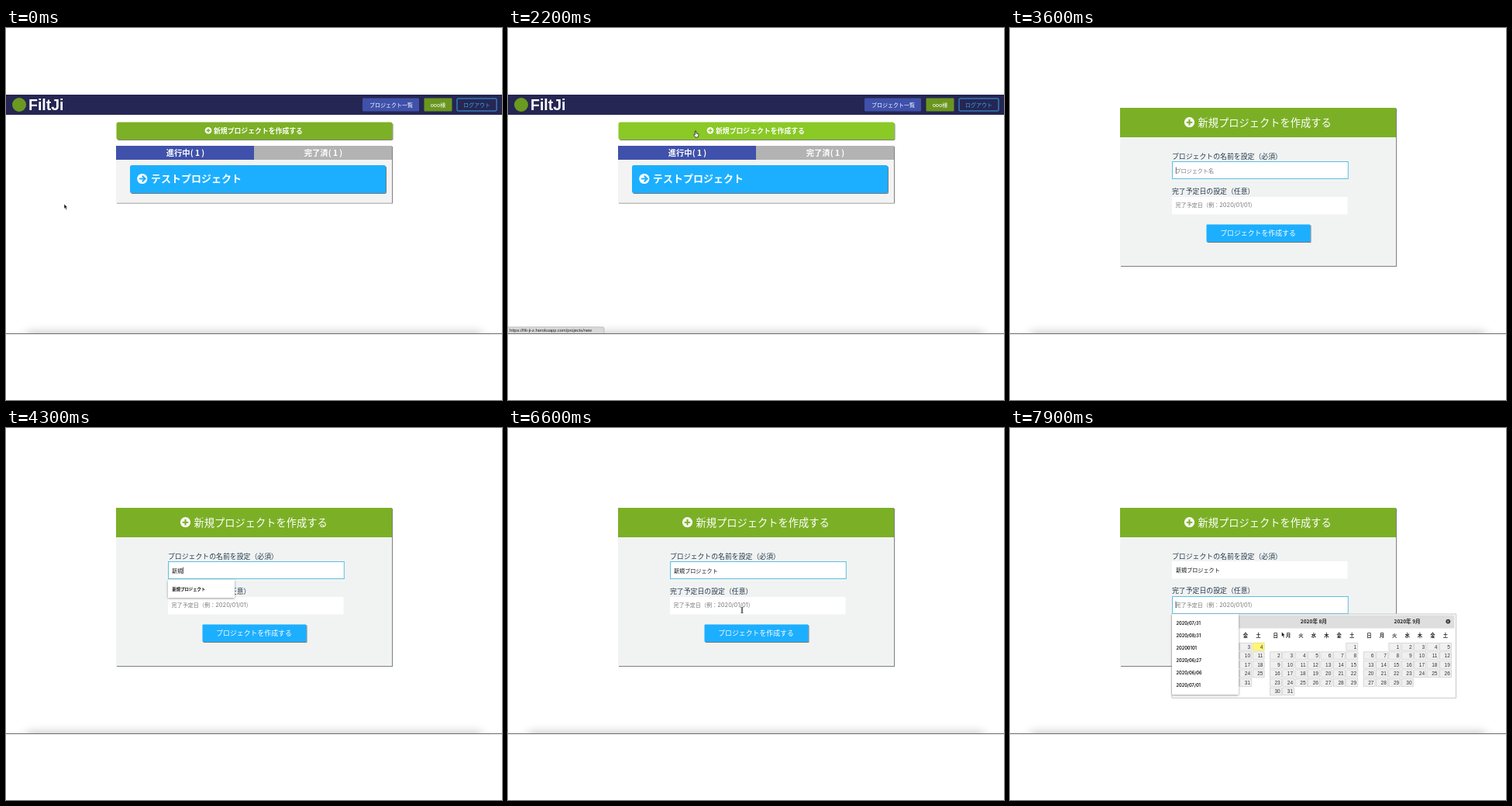
An HTML page that plays this animation: 640 px wide and 480 px high, repeating every 8000 ms.

```html
<!DOCTYPE html>
<html lang="ja">
<head>
<meta charset="utf-8">
<title>Project form</title>
<style>
html, body { margin: 0; width: 100%; height: 100%; overflow: hidden; background: #fff; }
svg { display: block; width: 640px; height: 480px; font-family: "Noto Sans CJK JP", "Noto Sans CJK", sans-serif; }
text { white-space: pre; }
.latin { font-family: Inter, "Noto Sans CJK JP", sans-serif; }
.arial { font-family: "Liberation Sans", sans-serif; }
.serif { font-family: "Noto Serif CJK JP", "Noto Serif", "Noto Sans CJK JP", serif; }
</style>
</head>
<body>
<svg viewBox="0 0 640 480">
  <defs>
    <filter id="drop" x="-10%" y="-20%" width="120%" height="150%">
      <feDropShadow dx="1" dy="1" stdDeviation=".7" flood-opacity=".5"/>
    </filter>
    <filter id="pop" x="-20%" y="-20%" width="140%" height="150%">
      <feDropShadow dx="0" dy="1" stdDeviation="1.4" flood-opacity=".4"/>
    </filter>
    <filter id="blur" x="-10%" y="-150%" width="120%" height="400%"><feGaussianBlur stdDeviation="7"/></filter>
    <clipPath id="screen"><path d="M0 86H640V395H0z"/></clipPath>
  </defs>
  <g id="stage" clip-path="url(#screen)"></g>
</svg>
<script>
const LOOP = 8000, STEP = 100;
const GREEN = '#7bb026', BLUE = '#1aafff', INK = '#253b4b', FOCUS = '#5cbfe2';
const stage = document.getElementById('stage');

const rect = (x, y, w, h, fill, extra = '') =>
  `<rect x="${x}" y="${y}" width="${w}" height="${h}" fill="${fill}" ${extra}/>`;
const text = (x, y, size, fill, str, extra = '') =>
  `<text x="${x}" y="${y}" font-size="${size}" fill="${fill}" ${extra}>${str}</text>`;
const path = (d, stroke, width, fill = 'none') =>
  `<path d="${d}" stroke="${stroke}" stroke-width="${width}" fill="${fill}"/>`;
const MID = 'text-anchor="middle"', BOLD = 'font-weight="700"';
const DROP = 'filter="url(#drop)"', POP = 'filter="url(#pop)"';

function icon(x, y, r, color, arrow) {
  const a = r * .58;
  const mark = arrow
    ? `M${x - a} ${y}H${x + a}M${x} ${y - a}L${x + a} ${y}L${x} ${y + a}`
    : `M${x - a} ${y}H${x + a}M${x} ${y - a}V${y + a}`;
  return `<circle cx="${x}" cy="${y}" r="${r}" fill="#fff"/>` + path(mark, color, r * .32);
}

function listPage(hover) {
  const green = hover ? '#8ac926' : GREEN;
  return rect(0, 86, 640, 26, '#252653')
    + '<circle cx="17" cy="99" r="9" fill="#6a9a1f"/>'
    + text(29, 105.5, 19.5, '#fff', 'FiltJi', `class="arial" ${BOLD}`)
    + rect(460, 90.5, 73, 17, '#4051ab', 'rx="1"') + text(497, 101.6, 7, '#fff', 'プロジェクト一覧', MID)
    + rect(539.5, 90.5, 36, 17, '#6a961f', 'rx="1"') + text(557.5, 101.6, 7, '#fff', 'ooo様', MID)
    + rect(582, 91, 51, 16, 'none', 'rx="1" stroke="#3ba4ea"') + text(607.5, 101.6, 7, '#3ba4ea', 'ログアウト', MID)
    + rect(142.5, 121.5, 356, 22.5, green, `rx="2.5" ${DROP}`)
    + icon(261, 132.3, 4.3, green) + text(268, 135.6, 8.85, '#fff', '新規プロジェクトを作成する', BOLD)
    + rect(142, 152, 356, 73.5, '#f3f3f3', DROP)
    + rect(142, 152, 178, 18, '#4051ab') + rect(320, 152, 178, 18, '#b3b3b3')
    + text(231.5, 164.8, 10.3, '#fff', '進行中( 1 )', `${MID} ${BOLD}`)
    + text(409.5, 164.8, 10.3, '#fff', '完了済( 1 )', `${MID} ${BOLD}`)
    + rect(160, 177, 330, 36, BLUE, `rx="2.5" ${DROP}`)
    + icon(175.8, 194.5, 6.6, BLUE, true) + text(187, 199.3, 13, '#fff', 'テストプロジェクト', BOLD);
}

function statusBar() {
  const url = 'https://filt-ji-z.herokuapp.com/projects/new';
  return rect(-2, 385.8, 126, 10, '#d8d8d8', 'rx="2" stroke="#a9a9a9" stroke-width=".6"')
    + text(2, 392.3, 5.7, '#222', url, 'class="arial"');
}

// focus: '', 'name' or 'date'
function formPage({ done, typing }, focus, caret) {
  const grow = focus ? 1 : 0, shift = focus === 'name' ? 1 : 0;
  const field = (y, on) => on
    ? rect(209.5, y + .5, 226.8, 22, '#fff', `stroke="${FOCUS}"`)
    : rect(209, y, 226.5, 22.3, '#fff');
  const size = 7.1, nameY = shift ? 186.6 : 186;
  const start = 214 + done.length * size;
  const latinTail = /[a-z]$/.test(typing);
  const end = start + typing.length * size - (latinTail ? 3.3 : 0);
  const empty = !done && !typing;
  let out = rect(142, 103, 356, 203 + grow, '#f1f3f3', DROP)
    + rect(142, 103, 356, 38, GREEN)
    + icon(231.5, 121.7, 6.6, GREEN) + text(242.5, 126.8, 13.25, '#fff', '新規プロジェクトを作成する')
    + text(209, 169, 8.9, INK, 'プロジェクトの名前を設定（必須）', 'font-weight="500"')
    + field(172, focus === 'name') + field(217 + shift, focus === 'date')
    + (empty ? text(213.5, nameY, 7.1, '#777', 'プロジェクト名')
             : text(214, nameY, size, '#111', done + typing, 'font-weight="500"'))
    + text(209, 213.4 + shift, 8.9, INK, '完了予定日の設定（任意）', 'font-weight="500"')
    + text(213.5, 230.6 + grow * .7, 7.1, '#777',
        '完了予定日（例：<tspan class="latin" font-size="7.5">2020/01/01</tspan>）')
    + rect(253.5, 252.5 + grow, 134, 22.5, BLUE, `rx="1" ${DROP}`)
    + text(320, 266.8 + grow, 8.9, '#fff', 'プロジェクトを作成する', MID);
  if (typing) out += path(`M${start} 188.3H${end}`, '#222', .7);
  if (caret && focus === 'name') out += path(`M${end + .3} 179.5V188`, '#222', .7);
  if (caret && focus === 'date') out += path('M214 223.5V232', '#222', .7);
  return out;
}

const nameHint = () => rect(209, 196, 86, 23, '#fff', POP)
  + text(214.5, 209.6, 5.35, '#111', '新規プロジェクト', BOLD);

function candidates() {
  const words = ['プロジェクト', 'プロジェクト管理', 'プロジェクター', 'プロジェクション', 'プロジェクタ'];
  return rect(226, 190, 84, 69, '#fff', POP)
    + words.map((w, i) => text(228.5, 198.2 + i * 12, 7.1, '#111', w, `class="serif" ${BOLD}`)).join('')
    + text(268, 256, 4.2, '#666', 'Tabキーで予測された単語を選択', MID);
}

function month(left, title, first, days) {
  const col = c => left + c * 16.4;
  let out = text(col(3), 251.6, 6.6, '#222', title, `${MID} ${BOLD}`);
  [...'日月火水木金土'].forEach((d, c) => out += text(col(c), 269.6, 6.3, '#222', d, `${MID} ${BOLD}`));
  for (let d = 1; d <= days; d++) {
    const n = d + first - 1, x = col(n % 7), y = 282.3 + Math.floor(n / 7) * 11.55;
    const today = days === 31 && first === 3 && d === 4;
    out += rect(x - 7.3, y - 5, 15, 9.8, today ? '#fff67a' : '#f0f0f0',
        `stroke="${today ? '#e5d96b' : '#ccc'}" stroke-width=".7"`)
      + text(x + 6, y + 2.3, 6.5, '#333', d, 'class="arial" text-anchor="end"');
  }
  return out;
}

function calendar() {
  const dates = ['2020/07/31', '2020/08/31', '20200101', '2020/06/27', '2020/06/06', '2020/07/01'];
  return rect(209, 240, 366.5, 108.3, '#fff', 'stroke="#bbb" stroke-width=".8"')
    + rect(211, 241.5, 362.5, 17, '#dedede')
    + month(222, '2020年 7月', 3, 31) + month(342.7, '2020年 8月', 6, 31) + month(463.4, '2020年 9月', 2, 30)
    + '<circle cx="565.3" cy="249.6" r="2.9" fill="#333"/>' + path('M564.2 248.5l2.2 2.2m0-2.2l-2.2 2.2', '#fff', .7)
    + rect(209, 240, 86, 104, '#fff', `rx="1" ${POP}`)
    + dates.map((d, i) => text(214.5, 254.2 + i * 16, 5.6, '#111', d, 'class="latin" font-weight="600"')).join('');
}

const dockShadow = () => rect(26, 394, 588, 20, '#000', 'opacity=".28" filter="url(#blur)"');

// Pointer route: time, x, y
const route = [
  [0, 75, 227], [600, 75, 227], [1000, 105, 205], [1900, 241, 140], [2200, 242, 133], [2500, 242, 133],
  [2900, 260, 188], [6400, 300, 205], [6600, 302, 235], [6800, 302, 231], [7200, 330, 250], [7600, 350, 263], [7900, 350.5, 263]
];
function pointerAt(t) {
  let i = route.length - 1;
  while (route[i][0] > t) i--;
  const a = route[i], b = route[i + 1] || a;
  const p = b === a ? 0 : (t - a[0]) / (b[0] - a[0]), e = p * p * (3 - 2 * p);
  return [a[1] + (b[1] - a[1]) * e, a[2] + (b[2] - a[2]) * e];
}

function pointer(t) {
  if (t >= 3300 && t < 6400) return '';
  const [x, y] = t < 3300 && t > 2900 ? [260, 188] : pointerAt(t);
  let shape;
  if (t < 1900 || t >= 7000)
    shape = path('M0 0V6.3L1.4 5L2.5 7.5L3.6 7L2.6 4.6H4.4Z', '#fff', .5, '#111');
  else if (t < 2700)
    shape = path('M-.8 0Q0 -.8 .6 0L1 3L3.4 3.4Q4.2 4 3.8 6L3 8H-.2L-2.4 5Q-2.2 4 -.6 4.8Z', '#222', .8, '#fff');
  else
    shape = path('M-1.5 -3.7Q0 -3.7 0 -3V3Q0 3.7 -1.5 3.7M1.5 -3.7Q0 -3.7 0 -3V3Q0 3.7 1.5 3.7', '#222', .8);
  return `<g transform="translate(${x} ${y})">${shape}</g>`;
}

// Input method: start time, committed text, text being composed
const typed = [
  [0, '', ''], [3700, '', 's'], [3800, '', 'し'], [3900, '', 'しn'], [4000, '', 'しんk'], [4100, '', 'しんき'],
  [4200, '', '新規'], [4300, '新規', ''], [4600, '新規', 'p'], [4700, '新規', 'ぷ'], [4800, '新規', 'ぷr'],
  [4900, '新規', 'ぷろ'], [5000, '新規', 'ぷろj'], [5100, '新規', 'ぷろじぇ'], [5300, '新規', 'ぷろじぇk'],
  [5400, '新規', 'ぷろじぇく'], [5500, '新規', 'ぷろじぇくt'], [5600, '新規', 'ぷろじぇくと'],
  [5800, '新規', 'プロジェクト'], [6100, '新規プロジェクト', '']
];

function render(t) {
  const hover = t >= 1900;
  let out = dockShadow();
  if (t < 2600) {
    out += listPage(hover) + (hover ? statusBar() : '');
  } else {
    const [, done, typing] = typed.filter(k => k[0] <= t).pop();
    const focus = t < 3200 ? '' : t < 6800 ? 'name' : 'date';
    out += formPage({ done, typing }, focus, t < 6400 || t >= 6800);
    if (t >= 4300 && t < 4600) out += nameHint();
    if (t >= 4700 && t < 5800) out += candidates();
    if (t >= 7000) out += calendar();
  }
  stage.innerHTML = out + rect(0, 394, 640, 1, '#6b6b6b') + pointer(t);
}

let shown = -1;
function tick() {
  const t = Math.floor(performance.now() % LOOP / STEP) * STEP;
  if (t !== shown) render(shown = t);
  requestAnimationFrame(tick);
}
tick();
</script>
</body>
</html>
```
